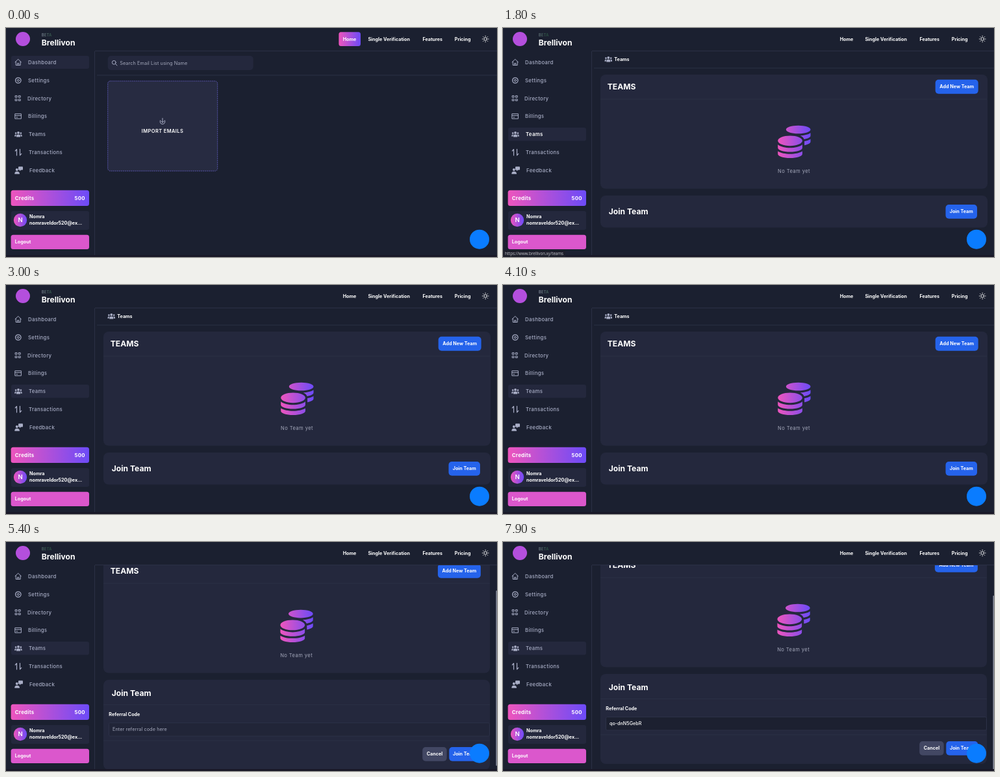
An HTML page that plays this animation: 756x354 px, repeating every 8000 ms.

```html
<!DOCTYPE html>
<html lang="en">
<head>
<meta charset="utf-8">
<title>Team dashboard</title>
<style>
html, body { margin: 0; width: 756px; height: 354px; overflow: hidden; background: #1b2030; }
svg { display: block; }
text { font: 700 7.2px Inter, sans-serif; fill: #fff; white-space: pre; }
.mid { text-anchor: middle; }
.side { font-weight: 500; font-size: 7.8px; letter-spacing: .33px; fill: #a9aec6; }
.side.hot { font-weight: 600; fill: #fff; }
.title { font-size: 12.1px; }
.soft { font-weight: 400; font-size: 7.3px; letter-spacing: .08px; fill: #a3a7ba; }
.icon { fill: none; stroke: #a9aec6; stroke-width: 1; stroke-linecap: round; stroke-linejoin: round; }
.solid { fill: #a9aec6; }
.card { fill: #24283d; }
.blue { fill: #2563eb; }
.line { stroke: #2b3045; stroke-width: 1; }
</style>
</head>
<body>
<svg width="756" height="354" viewBox="0 0 756 354">
  <defs>
    <linearGradient id="glow"><stop stop-color="#ee55bd"/><stop offset="1" stop-color="#6c4bf8"/></linearGradient>
    <linearGradient id="beta" gradientUnits="userSpaceOnUse" x1="55" x2="71" y1="0" y2="0">
      <stop stop-color="#7c8494"/><stop offset="1" stop-color="#2c5544"/>
    </linearGradient>
    <clipPath id="view"><path d="M137 36H756V354H137Z"/></clipPath>
    <g id="people" class="solid">
      <circle cx="0" cy="-2.4" r="1.9"/><circle cx="-3.9" cy="-1.7" r="1.3"/><circle cx="3.9" cy="-1.7" r="1.3"/>
      <path d="M-3 4.3V2.6Q-3 .2 0 .2T3 2.6V4.3ZM-5.7 3.4V1.8Q-5.5 .1-3 .3Q-3.8 1.3-3.7 3.4ZM5.7 3.4V1.8Q5.5 .1 3 .3Q3.8 1.3 3.7 3.4Z"/>
    </g>
  </defs>

  <g clip-path="url(#view)">
    <g id="home">
      <path class="line" d="M140 73H756"/>
      <rect class="card" x="156.7" y="43" width="224" height="22" rx="5"/>
      <g class="icon"><circle cx="166.3" cy="53.3" r="2.9"/><path d="M168.5 55.5L171 58"/></g>
      <text class="soft" x="175.2" y="56.6">Search Email List using Name</text>
      <rect id="hover" x="156.7" y="82" width="169" height="139" rx="4" fill="#272b41"/>
      <rect x="156.7" y="82" width="169" height="139" rx="4" fill="none" stroke="#5653a8" stroke-dasharray="2 1"/>
      <path class="icon" d="M241 139.5V146M238.9 144L241 146.2L243.1 144M237.4 143Q236.5 148.5 241 148.5T244.6 143"/>
      <text x="208.8" y="162.2" style="font-weight:600;font-size:7.5px;letter-spacing:.38px">IMPORT EMAILS</text>
    </g>

    <g id="teams">
      <g id="scroll">
        <path class="line" d="M140 62H756"/>
        <use href="#people" x="162.3" y="48.3"/>
        <text x="171.3" y="50.5">Teams</text>

        <rect class="card wide" x="150" y="72" width="596" height="176.5" rx="8"/>
        <path class="line" d="M150 110H745"/>
        <text class="title" x="160.8" y="95">TEAMS</text>
        <g class="nudge">
          <rect class="blue" x="665.7" y="79.7" width="66" height="22" rx="5"/>
          <text class="mid" x="698.7" y="93.2">Add New Team</text>
          <path fill="url(#glow)" transform="translate(423.2 150.7) scale(.0983)" d="M0 405.3V448c0 35.3 86 64 192 64s192-28.7 192-64v-42.7C342.7 434.4 267.2 448 192 448S41.3 434.4 0 405.3zM320 128c106 0 192-28.7 192-64S426 0 320 0 128 28.7 128 64s86 64 192 64zM0 300.4V352c0 35.3 86 64 192 64s192-28.7 192-64v-51.6c-41.3 34-116.9 51.6-192 51.6S41.3 334.4 0 300.4zm416 11c57.3-11.1 96-31.7 96-55.4v-42.7c-23.2 16.4-57.3 27.6-96 34.5v63.6zM192 160C86 160 0 195.8 0 240s86 80 192 80 192-35.8 192-80-86-80-192-80zm219.3 56.3c60-10.8 100.7-32 100.7-56.3v-42.7c-35.5 25.1-96.5 38.6-160.7 41.8 29.5 14.3 51.2 33.5 60 57.2z"/>
          <text class="soft" x="423" y="223.5" style="font-size:7.6px;letter-spacing:.42px">No Team yet</text>
        </g>

        <rect id="joinCard" class="card wide" x="150" y="259" width="596" height="49.5" rx="8"/>
        <text id="joinTitle" class="title" x="162.8" y="288.2">Join Team</text>
        <g id="joinButton">
          <rect class="blue" x="681.5" y="273" width="48.5" height="21.7" rx="5"/>
          <text class="mid" x="705.8" y="286.3">Join Team</text>
        </g>
        <g id="form">
          <path class="line" d="M150 297.5H745M150 353H745"/>
          <text x="158.3" y="315">Referral Code</text>
          <rect id="field" x="158.5" y="325.5" width="586" height="20.5" rx="2" stroke="#2c3147"/>
          <text id="value" x="164" y="338.3"></text>
          <path id="caret" d="M0 331V340.5" stroke="#e8e9f0" stroke-width=".8"/>
          <rect x="641.2" y="363" width="37.5" height="21.7" rx="5" fill="#424763"/>
          <text class="mid" x="660" y="376.3">Cancel</text>
          <rect class="blue" x="682.3" y="363" width="49" height="21.7" rx="5"/>
          <text x="688" y="376.3">Join Team</text>
        </g>
      </g>
    </g>
    <rect id="thumb" x="754.5" y="36" width="1.5" height="271" rx=".7" fill="#8b8f9e"/>
  </g>

  <path class="line" d="M137 35.5H756M136.5 36V351" fill="none"/>
  <circle cx="26" cy="17" r="11" fill="#b44fdd"/>
  <text x="55" y="13.2" style="font-weight:600;font-size:5.6px;letter-spacing:.3px;fill:url(#beta)">BETA</text>
  <text x="54.8" y="27.2" style="font-size:12.1px">Brellivon</text>
  <rect id="homeTab" x="512.4" y="6.2" width="33.6" height="21.8" rx="3.5" fill="url(#glow)"/>
  <text x="518.7" y="19.5">Home</text>
  <text x="557.4" y="19.5">Single Verification</text>
  <text x="641.4" y="19.5">Features</text>
  <text x="690.8" y="19.5">Pricing</text>
  <g id="sun" fill="none" stroke="#fff" stroke-width=".9" stroke-linecap="round" transform="translate(738.2 17)">
    <circle r="2.3"/>
  </g>

  <rect id="dashRow" class="card" x="8" y="43" width="120" height="20" rx="3"/>
  <rect id="teamRow" class="card" x="8" y="154" width="120" height="20.5" rx="3"/>
  <g class="icon">
    <path d="M14 52.8L18.7 48.3L23.4 52.8M15.2 52V57.5H22.2V52M17.6 57.5V54.5H19.8V57.5"/>
    <circle cx="18.8" cy="81" r="4.2" stroke-width="1.3"/><circle cx="18.8" cy="81" r="1.6"/>
    <path d="M14.5 104.7H17V107.2H14.5ZM19.7 104.7H22.2V107.2H19.7ZM14.5 110H17V112.5H14.5ZM19.7 110H22.2V112.5H19.7Z"/>
    <path d="M14.2 132.7H23.4V140.2H14.2ZM14.2 135.3H23.4M16 138H17.5"/>
    <path d="M16.5 197V187.5L14.3 190M21.5 187.3V196.8L23.7 194.3" stroke-width="1.2"/>
  </g>
  <use href="#people" x="19" y="164.3"/>
  <g class="solid">
    <circle cx="16.8" cy="219" r="2"/><path d="M13.3 225.7Q13 221.8 17 221.8T21 225.7ZM20 214.3H25Q26 214.3 26 215.3V218.5Q26 219.5 25 219.5H23L21 221.3V219.5H20Q19 219.5 19 218.5V215.3Q19 214.3 20 214.3Z"/>
  </g>
  <g id="menu"></g>

  <rect x="7.6" y="250.8" width="120.4" height="24.2" rx="3.5" fill="url(#glow)"/>
  <g style="letter-spacing:.3px">
    <text x="13.8" y="266.1" style="font-size:7.8px">Credits</text>
    <text x="105.6" y="266.1" style="font-size:7.8px">500</text>
  </g>
  <rect class="card" x="8" y="283" width="120" height="29" rx="3"/>
  <circle cx="22" cy="297" r="10.2" fill="url(#glow)"/>
  <text class="mid" x="22" y="300.4" style="font-weight:600;font-size:9.5px">N</text>
  <text x="36" y="294.4">Nomra</text>
  <text x="36" y="304.2">nomraveldor520@ex...</text>
  <rect x="7.6" y="319.7" width="120.4" height="22.2" rx="3.5" fill="#db57cc"/>
  <text x="13.8" y="333.2">Logout</text>

  <rect y="351" width="756" height="3" fill="#191827"/>
  <g id="status">
    <rect y="343.5" width="96" height="10.5" fill="#1d1f2b"/>
    <text x="3" y="350.8" style="font:400 6.2px 'Open Sans',sans-serif;fill:#c9cbd2">https://www.brellivon.xy/teams</text>
  </g>
  <circle cx="729" cy="326.7" r="15" fill="#0a7cff"/>
</svg>
<script>
const LOOP = 8000;
const $ = id => document.getElementById(id);
const all = selector => document.querySelectorAll(selector);
const ramp = (t, from, to) => Math.min(1, Math.max(0, (t - from) / (to - from)));
const between = (t, from, to) => t >= from && t < to;
const fade = (id, opacity) => $(id).setAttribute('opacity', opacity);

const items = [['Dashboard', 34], ['Settings', 34], ['Directory', 33], ['Billings', 34],
  ['Teams', 35], ['Transactions', 35], ['Feedback', 36]];
$('menu').innerHTML = items.map(([name, x], i) =>
  `<text class="side" x="${x}" y="${55.9 + i * 27.85}">${name}</text>`).join('');
const teamLabel = $('menu').children[4];

let rays = '';
for (let i = 0; i < 8; i++) rays += `<path d="M0 -4V-4.9" transform="rotate(${i * 45})"/>`;
$('sun').innerHTML += rays;

function draw(t) {
  // Page switch
  fade('hover', 1 - ramp(t, 50, 220));
  fade('home', +(t < 1300));
  fade('homeTab', 1 - ramp(t, 1250, 1450));
  fade('teams', ramp(t, 1400, 1750));
  fade('dashRow', +(t < 1300));
  fade('teamRow', +(t >= 1100));
  teamLabel.classList.toggle('hot', between(t, 1100, 2500));
  fade('status', ramp(t, 650, 900) * (1 - ramp(t, 2750, 3000)));

  // Join form
  const open = t >= 4300;
  fade('form', ramp(t, 4220, 4400) * open);
  fade('joinButton', +!open);
  fade('thumb', +open);
  $('joinCard').setAttribute('height', open ? 139 : 49.5);
  $('joinTitle').setAttribute('y', open ? 284.4 : 288.2);
  all('.wide').forEach(card => card.setAttribute('width', open ? 595 : 596));
  all('.nudge').forEach(part => part.setAttribute('transform', `translate(${open ? -.8 : 0})`));

  const y = 55 * (1 - (1 - ramp(t, 5200, 5700)) ** 3.5);
  $('scroll').setAttribute('transform', `translate(0 ${-y})`);
  $('thumb').setAttribute('y', 36 + y * .85);

  // Field
  const pasted = t >= 7300;
  const focus = ramp(t, 5850, 6250);
  $('field').setAttribute('fill', `rgb(${33 - 5 * focus} ${37 - 5 * focus} ${56 - 8 * focus})`);
  const value = $('value');
  value.textContent = pasted ? 'qo-dnN5GebR' : 'Enter referral code here';
  value.setAttribute('class', pasted ? '' : 'soft');
  value.style.fontWeight = pasted ? 500 : 400;
  const caretX = pasted ? 164.6 + value.getComputedTextLength() : 164;
  $('caret').setAttribute('transform', `translate(${caretX})`);
  fade('caret', +(between(t, 6250, 6800) || between(t, 7300, 7850)));

  // Badge shimmer
  const shift = 8 * Math.sin(t / LOOP * Math.PI * 8);
  $('beta').setAttribute('gradientTransform', `translate(${shift})`);
}

function tick() {
  draw(performance.now() % LOOP);
  requestAnimationFrame(tick);
}
tick();
</script>
</body>
</html>
```
